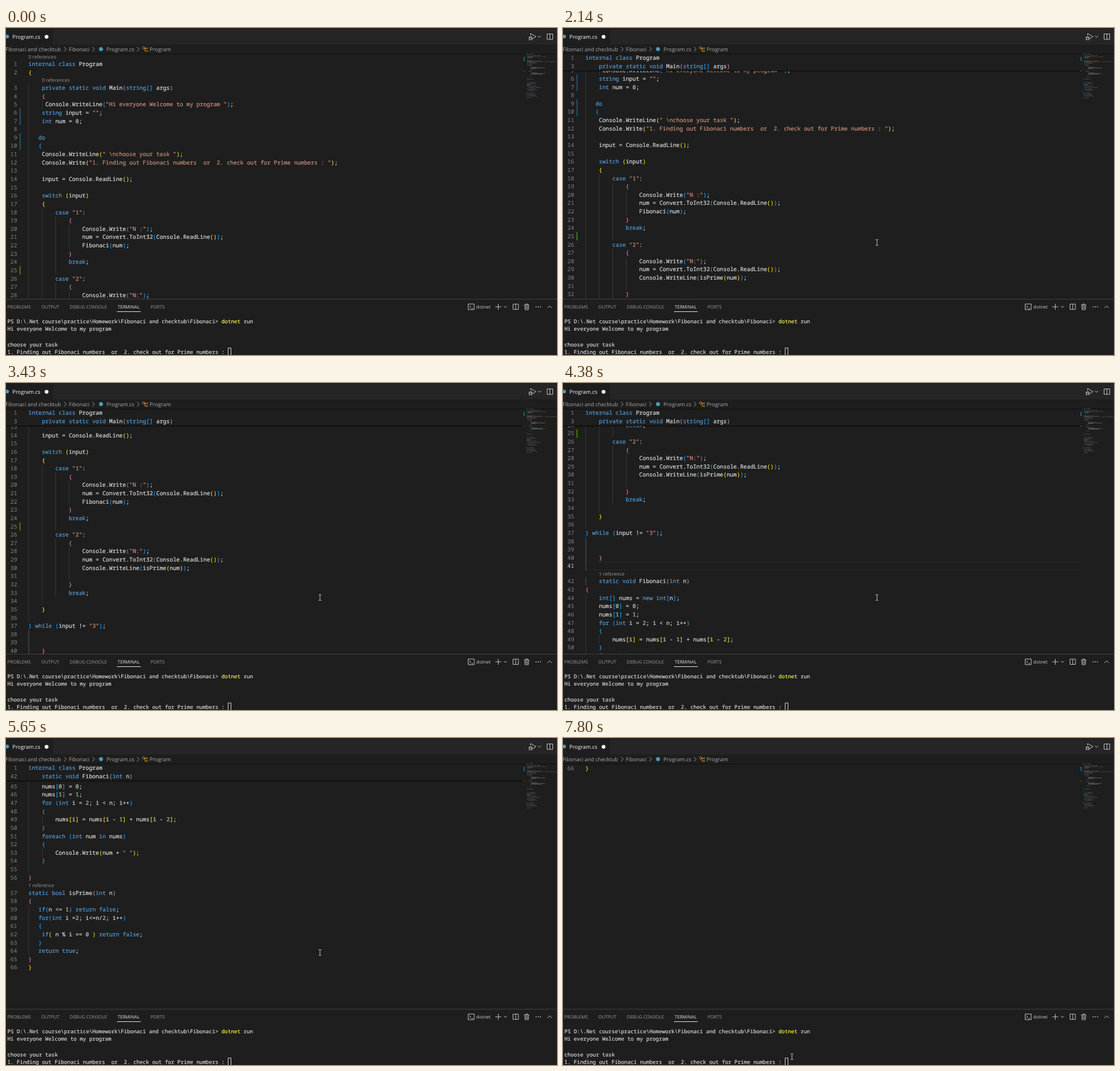
Animation of 971x577 px, one loop 8 s. Source, as an HTML page:

```html
<!DOCTYPE html>
<html lang="en">
<head>
<meta charset="utf-8">
<title>Code editor</title>
<style>
html, body { margin: 0; width: 100%; height: 100%; overflow: hidden; background: #1e1e1e; }
svg { display: block; width: 100%; height: 100%; }
text { white-space: pre; text-rendering: geometricPrecision; }
.code, .term { fill: currentColor; stroke: currentColor; stroke-width: .2; }
.code { font: 9.9px "Noto Sans Mono", monospace; color: #dcdcdc; }
.term { font: 9.25px "Noto Sans Mono", monospace; color: #d8d8d8; }
.num { text-anchor: end; color: #858585; stroke: none; }
.ui { font: 9.4px "Open Sans", sans-serif; fill: #a9a9a9; }
.lens { font-size: 8.55px; fill: #999; }
.panel { font-size: 8px; fill: #9d9d9d; }
.icon { fill: none; stroke: #c5c5c5; stroke-width: 1; }
</style>
</head>
<body>
<svg viewBox="0 0 971 577" preserveAspectRatio="none">
  <defs>
    <clipPath id="pane"><rect y="45" width="971" height="433"/></clipPath>
    <linearGradient id="fade" x2="0" y2="1">
      <stop stop-color="#000" stop-opacity=".75"/>
      <stop offset="1" stop-color="#000" stop-opacity="0"/>
    </linearGradient>
  </defs>
  <rect width="971" height="577" fill="#1e1e1e"/>
  <g clip-path="url(#pane)">
    <g id="doc"></g>
    <g id="sticky"></g>
    <rect id="shadow" width="911" height="2.6" fill="url(#fade)"/>
    <rect y="45" width="971" height="2.5" fill="url(#fade)" opacity=".55"/>
  </g>
  <g id="map"></g>
  <g id="chrome"></g>
  <g id="mouse" fill="none" stroke="#dcdcdc" stroke-width=".9">
    <path d="M-2.5-5H-.8L0-4.4L.8-5H2.5M0-4.4V4.4M-2.5 5H-.8L0 4.4L.8 5H2.5"/>
  </g>
</svg>
<script>
const SOURCE = String.raw`internal class Program
{
    private static void Main(string[] args)
    {
     Console.WriteLine("Hi everyone Welcome to my program ");
    string input = "";
    int num = 0;

   do
   {
    Console.WriteLine(" \nchoose your task ");
    Console.Write("1. Finding out Fibonaci numbers  or  2. check out for Prime numbers : ");

    input = Console.ReadLine();

    switch (input)
    {
        case "1":
            {
                Console.Write("N :");
                num = Convert.ToInt32(Console.ReadLine());
                Fibonaci(num);
            }
            break;

        case "2":
            {
                Console.Write("N:");
                num = Convert.ToInt32(Console.ReadLine());
                Console.WriteLine(isPrime(num));

            }
            break;

    }

} while (input != "3");


    }

    static void Fibonaci(int n)
{
    int[] nums = new int[n];
    nums[0] = 0;
    nums[1] = 1;
    for (int i = 2; i < n; i++)
    {
        nums[i] = nums[i - 1] + nums[i - 2];
    }
    foreach (int num in nums)
    {
        Console.Write(num + " ");
    }

}
static bool isPrime(int n)
{
   if(n <= 1) return false;
   for(int i =2; i<=n/2; i++)
   {
    if( n % i == 0 ) return false;
   }
   return true;
}
}`.split("\n");

const LOOP = 8000, LINE = 14.63, LENS = 12.4, CHAR = 5.94, LEFT = 39.5;
const KEYWORDS = "internal class private static void string int do while switch case break new for foreach in bool if return true false";
const TOKEN = new RegExp(`"[^"]*"|\\b(?:${KEYWORDS.replace(/ /g, "|")})\\b|[\\[\\](){}]|\\b\\d+\\b|[^"\\[\\](){}\\s\\w]+|\\w+|\\s+`, "g");
const BRACKETS = ["#ffd700", "#da70d6", "#179fff"];
const keywords = new Set(KEYWORDS.split(" "));
const $ = id => document.getElementById(id);

function add(parent, tag, attrs = {}, text) {
  const el = document.createElementNS("http://www.w3.org/2000/svg", tag);
  for (const k in attrs) el.setAttribute(k, attrs[k]);
  if (text !== undefined) el.textContent = text;
  parent.appendChild(el);
  return el;
}
const rect = (p, x, y, width, height, fill) => add(p, "rect", {x, y, width, height, fill});
const label = (p, x, y, cls, str, extra) => add(p, "text", {x, y, class: cls, ...extra}, str);
const span = (p, str, color, cls) => add(p, "tspan", {class: cls, style: `color:${color}`}, str);

// Split every line into coloured tokens; bracket colour follows nesting depth.
let depth = 0;
function colour(tok) {
  if (tok[0] === '"') return "#ce9178";
  if (keywords.has(tok)) return "#569cd6";
  if (/^\d+$/.test(tok)) return "#b5cea8";
  if (/^[\[({]$/.test(tok)) return BRACKETS[depth++ % 3];
  if (/^[\])}]$/.test(tok)) return BRACKETS[--depth % 3];
  return "#dcdcdc";
}
const lines = SOURCE.map(src => (src.match(TOKEN) || []).map(str => ({str, fill: colour(str)})));

const lenses = {1: "0 references", 3: "0 references", 42: "1 reference", 57: "1 reference"};
const lensCount = n => Object.keys(lenses).filter(k => k <= n).length;
const lineY = n => 51.6 + (n - 1) * LINE + lensCount(n) * LENS;

function drawLine(parent, n, y) {
  label(parent, 19.6, y + 3.4, "code num", n, n === 41 ? {style: "color:#d0d0d0"} : {});
  const text = label(parent, LEFT, y + 3.4, "code");
  for (const {str, fill} of lines[n - 1]) span(text, str, fill, "code");
}

function drawDocument() {
  const doc = $("doc");
  const top = n => lineY(n) - LINE / 2;
  for (const edge of [0, 1]) rect(doc, 40, top(41) + edge * (LINE - 1), 871, 1, "#2a2a2a");
  const guide = (col, from, to, fill = "#404040") =>
    rect(doc, LEFT + .2 + col * CHAR, top(from), .8, top(to) + LINE - top(from), fill);
  guide(0, 3, 36);
  guide(0, 38, 41, "#6a6a6a");
  guide(0, 42, 42, "#6a6a6a");
  guide(0, 44, 55);
  guide(0, 59, 64);
  for (const [a, b] of [[5, 5], [18, 34], [49, 49], [53, 53]]) guide(4, a, b);
  for (const [a, b] of [[19, 25], [27, 33]]) guide(8, a, b);
  for (const [a, b] of [[20, 22], [28, 31]]) guide(12, a, b);
  for (const [a, b] of [[6, 7], [9, 10]])
    add(doc, "path", {d: `M24.8 ${top(a)}V${top(b) + LINE}`, stroke: "#1b81a8", "stroke-width": 2, "stroke-dasharray": "1.4 1"});
  rect(doc, 23.6, top(25), 2, LINE, "#487e02");
  lines.forEach((_, i) => drawLine(doc, i + 1, lineY(i + 1)));
  for (const n in lenses) {
    const col = SOURCE[n - 1].search(/\S/);
    label(doc, LEFT + col * CHAR, lineY(+n) - 10.3, "ui lens", lenses[n]);
  }
}

// Scopes whose header line sticks to the top: [first, last, resting y].
const scopes = [[3, 39, 67.6], [42, 55, 67.6], [57, 64, 67.6], [1, 65, 52.8]].map(([first, last, rest]) => {
  const g = add($("sticky"), "g");
  rect(g, 0, -9, 911, 16.4, "#1e1e1e");
  drawLine(g, first, 0);
  return {g, first, last, rest};
});

function drawMinimap() {
  const map = $("map");
  lines.forEach((tokens, i) => {
    let x = 916;
    for (const {str, fill} of tokens) {
      let at = 0;
      for (const word of str.split(/(\s+)/)) {
        if (word.trim()) add(map, "rect", {x: x + at * .593, y: 45.4 + i * 1.23, width: word.length * .56, height: .8, fill, opacity: .42});
        at += word.length;
      }
      x += str.length * .593;
    }
  });
  rect(map, 912, 51.5, 2, 2.6, "#1b81a8");
  rect(map, 912, 55.2, 2, 2.6, "#1b81a8");
  rect(map, 912, 75, 1.5, 1.4, "#487e02");
}

function drawChrome() {
  const c = $("chrome");
  const icon = (d, extra) => add(c, "path", {d, class: "icon", ...extra});
  const dot = (cx, cy, r, fill) => add(c, "circle", {cx, cy, r, fill});
  rect(c, 0, 0, 971, 29, "#252526");
  rect(c, 0, 0, 971, 2, "#1f1f1f");
  rect(c, 0, 2, 83, 27, "#1e1e1e");
  dot(2, 15, 3.2, "#519aba");
  label(c, 11.3, 19, "ui", "Program.cs", {style: "fill:#fff"});
  dot(71.5, 15.6, 3.3, "#fff");

  label(c, -.8, 41.2, "ui", "Fibonaci and checktub");
  label(c, 110.8, 41.2, "ui", "Fibonaci");
  label(c, 177, 41.2, "ui", "Program.cs");
  label(c, 253, 41.2, "ui", "Program");
  for (const x of [102.5, 152.3, 231]) icon(`M${x} 33.5l3.6 3.9l-3.6 3.9`, {style: "stroke:#a0a0a0"});
  dot(167.4, 37.3, 3.5, "#519aba");
  icon("M240 35.2l2.6-2.6l2.4 2.4l-2.6 2.6zM244 36h3M245 36v4.8h2M247.2 35.8l1.4-1.4l1.3 1.3l-1.4 1.4zM247.2 40.6l1.4-1.4l1.3 1.3l-1.4 1.4z", {style: "stroke:#ee9d28"});

  icon("M924.5 13V9.8L934 15.2L927.5 19.2");
  icon("M922.8 16.2h3.4v3.6q-1.7 2-3.4 0zM921 16.2h1.8M921 18.4h1.8M921 20.8h1.8M926.2 16.2h1.6M926.2 18.4h1.6M926.2 20.8h1.6M923.2 16q1.3-2.4 2.6 0");
  icon("M937.4 13.8l2.7 2.7l2.7-2.7");
  icon("M953.5 10.5h10v9.5h-10zM958.5 10.5v9.5");

  rect(c, 0, 478, 971, 1, "#414141");
  const tabs = [[2.5, "PROBLEMS"], [62.3, "OUTPUT"], [112.3, "DEBUG CONSOLE"], [196.8, "TERMINAL"], [254.8, "PORTS"]];
  for (const [x, name] of tabs) label(c, x, 494.9, "ui panel", name, name === "TERMINAL" ? {style: "fill:#e7e7e7"} : {});
  rect(c, 195.5, 500, 42, 1, "#e7e7e7");

  icon("M814.5 487h10.6v10h-10.6zM816.6 489.8l2.4 2.2l-2.4 2.2M820 495h3");
  label(c, 828.8, 495.2, "ui", "dotnet", {style: "font-size:8.1px;fill:#ccc"});
  icon("M867.5 486.8v10.4M862.3 492h10.4M877.6 490.7l2.5 2.5l2.5-2.5");
  icon("M893.5 487.2h9.5v9.3h-9.5zM898.2 487.2v9.3");
  icon("M913 488.8h9M916 488.6v-1.6h3.2v1.6M914.2 489l.5 8h5.8l.5-8M916.5 490.5v5M918.8 490.5v5");
  for (const x of [934.2, 938, 941.8]) dot(x, 492, .9, "#c5c5c5");
  icon("M954.2 494l3.8-3.8l3.8 3.8");

  const prompt = label(c, 2.4, 520.8, "term", "PS D:\\.Net course\\practice\\Homework\\Fibonaci and checktub\\Fibonaci> ");
  span(prompt, "dotnet", "#f5f543", "term");
  span(prompt, " run", "#d8d8d8", "term");
  label(c, 2.4, 534.4, "term", "Hi everyone Welcome to my program");
  label(c, 2.4, 561.5, "term", "choose your task");
  label(c, 2.4, 575, "term", "1. Finding out Fibonaci numbers  or  2. check out for Prime numbers : ");
  icon("M391.5 564.5h5v13h-5z", {style: "stroke:#d4d4d4"});
}

// Scroll offset over time, refreshed in short steps from the start of each swipe.
const swipes = [1390, 2000, 2540, 3160, 4170, 5100, 5930];
const track = [
  [1323, 0], [1810, 11.3], [1933, 11.3], [2000, 24], [2134, 60], [2268, 84],
  [2473, 84], [2740, 116], [2940, 135], [3093, 135], [3294, 153], [3428, 174.3],
  [3700, 268], [3970, 300], [4103, 300], [4237, 313], [4371, 338.6], [4600, 405],
  [4907, 440], [5033, 440], [5100, 448.5], [5300, 510], [5600, 634], [5860, 729],
  [6265, 868.5], [6667, 987], [6801, 998.4]
];
function scrollAt(t) {
  const start = swipes.filter(s => s <= t).pop();
  if (start === undefined) return 0;
  const now = start + Math.floor((t - start) / 67) * 67;
  const i = track.findIndex(k => k[0] > now);
  if (i < 0) return track[track.length - 1][1];
  if (i === 0) return 0;
  const [t0, a] = track[i - 1], [t1, b] = track[i];
  return a + (b - a) * (now - t0) / (t1 - t0);
}

function mouseAt(t) {
  const ease = (t0, step, count) => {
    const k = Math.min(1, Math.floor((t - t0) / step) / count);
    return 1 - (1 - k) ** 2;
  };
  if (t < 450 || (t >= 6800 && t < 7530)) return null;
  if (t < 6740) {
    const k = ease(450, 70, 3);
    return [863 - 309.7 * k, 532 - 153.5 * k];
  }
  if (t < 6800) return [545, 453];
  const k = ease(7530, 67, 4);
  return [411.5 - 8 * k, 567.5 - 5.2 * k];
}

function render(t) {
  const s = scrollAt(t);
  $("doc").setAttribute("transform", `translate(0 ${-s})`);
  let bottom = 0;
  for (const {g, first, last, rest} of scopes) {
    const end = lineY(last) - s;
    const on = lineY(first) - s < rest && end > rest - LINE + 2;
    const y = Math.min(rest, end);
    g.style.display = on ? "" : "none";
    g.setAttribute("transform", `translate(0 ${y})`);
    if (on) bottom = Math.max(bottom, y + 7.4);
  }
  $("shadow").setAttribute("y", bottom);
  const pos = mouseAt(t);
  $("mouse").style.display = pos ? "" : "none";
  if (pos) $("mouse").setAttribute("transform", `translate(${pos})`);
}

drawDocument();
drawMinimap();
drawChrome();
const tick = () => {
  render(performance.now() % LOOP);
  requestAnimationFrame(tick);
};
tick();
</script>
</body>
</html>
```
